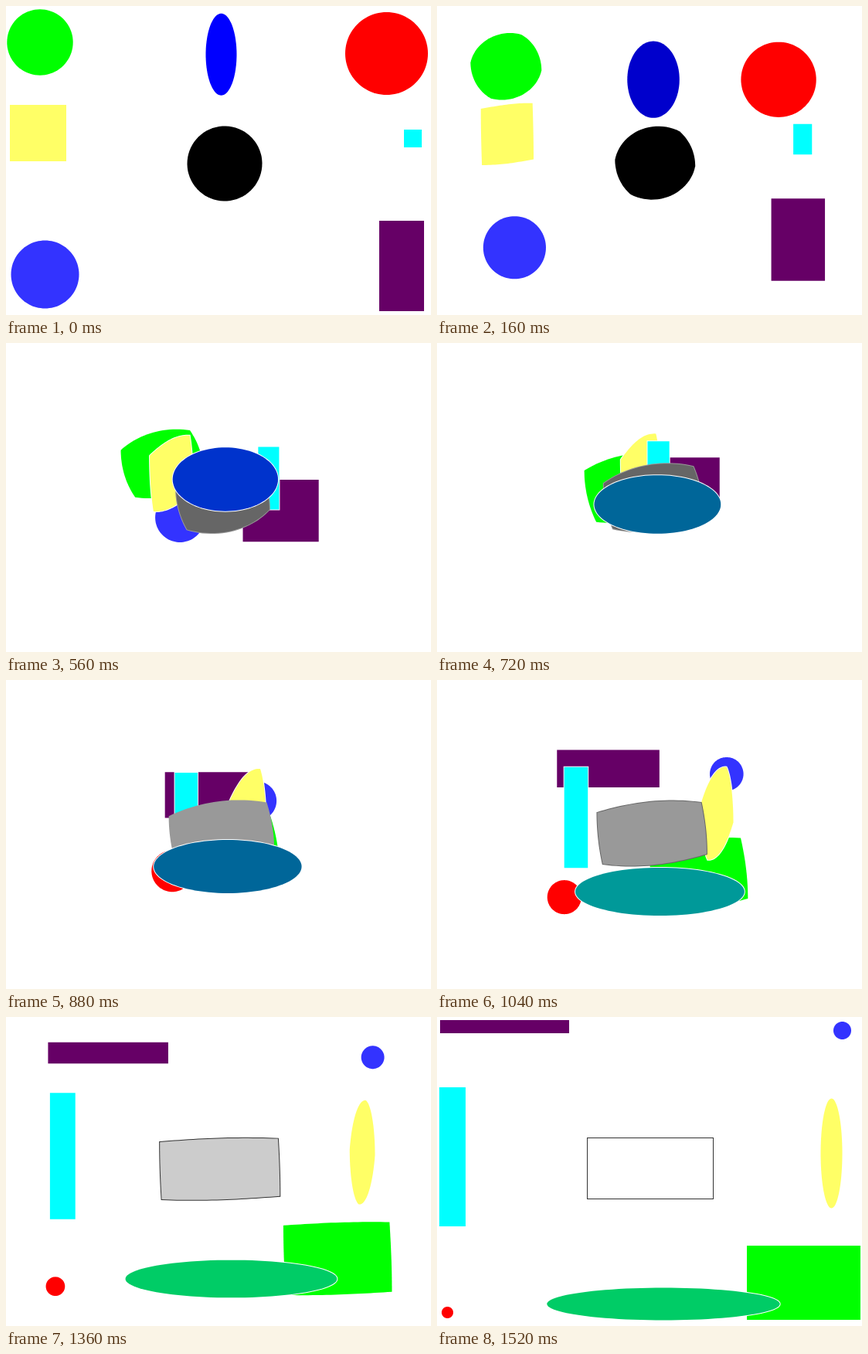
An HTML page with a canvas that plays this animation: 550 by 400 pixels, repeating every 1600 ms.

```html
<!DOCTYPE html>
<html lang="en">
<head>
<meta charset="utf-8">
<title>Shape tweens</title>
<style>
  html, body { margin: 0; width: 100%; height: 100%; overflow: hidden; background: #fff; }
  canvas { display: block; }
</style>
</head>
<body>
<canvas id="stage" width="550" height="400"></canvas>
<script>
const ctx = document.getElementById('stage').getContext('2d');
const STEPS = 20, STEP_MS = 80;
const SAMPLES = 24; // points per side of an outline

const lerp = (a, b, t) => a + (b - a) * t;

// An outline maps (side 0..3, position t 0..1) to a point, clockwise from the left.
// `corner` is the angle in degrees above the right-hand end where side 1 starts.
function ring(cx, cy, rx, ry = rx, corner = 90) {
  const knots = [180, 360 - corner, 360, 540 - corner, 540];
  return (side, t) => {
    const a = lerp(knots[side], knots[side + 1], t) * Math.PI / 180;
    return [cx + rx * Math.cos(a), cy + ry * Math.sin(a)];
  };
}

function box(x, y, w, h) {
  const corners = [[x, y], [x + w, y], [x + w, y + h], [x, y + h], [x, y]];
  return (side, t) => {
    const [p, q] = [corners[side], corners[side + 1]];
    return [lerp(p[0], q[0], t), lerp(p[1], q[1], t)];
  };
}

// Colours step through the six web-safe levels.
function webSafe(from, to, p) {
  const level = (c, i) => 51 * Math.round(lerp(c, to[i], p) / 51 - 0.05);
  return `rgb(${from.map(level)})`;
}

const solid = color => () => color;
const fade = (from, to) => p => webSafe(from, to, p);
const WHITE = [255, 255, 255];

// Back to front.
const shapes = [
  { from: ring(492.5, 61.5, 53.5), to: ring(13.5, 382.5, 7.5), fill: solid('#f00') },
  { from: ring(44, 47, 42.7, 42.7, 72), to: box(401, 296, 147, 96), fill: solid('#0f0') },
  { from: ring(50.5, 347.5, 44), to: ring(524.5, 17.5, 11.5), fill: solid('#33f') },
  { from: box(483, 278, 58, 117), to: box(4, 4, 167, 17), fill: solid('#606') },
  { from: box(5, 128, 73, 73), to: ring(510.5, 176.5, 14, 71, 86), fill: solid('#ff6') },
  { from: box(515, 160, 23, 23), to: box(3, 91, 34, 180), fill: solid('#0ff') },
  { from: ring(283, 204, 48.5, 48.5, 58), to: box(195, 157, 162, 78),
    fill: fade([0, 0, 0], WHITE), line: fade(WHITE, [51, 51, 51]) },
  { from: ring(278.5, 62.7, 20, 53), to: ring(293, 371.5, 150.7, 21),
    fill: p => p ? webSafe([0, 0, 240], [0, 204, 102], p) : '#00f' },
];

function drawShape({ from, to, fill, line = solid('#fff') }, p) {
  ctx.beginPath();
  for (let side = 0; side < 4; side++) {
    for (let i = 0; i < SAMPLES; i++) {
      const a = from(side, i / SAMPLES), b = to(side, i / SAMPLES);
      ctx.lineTo(lerp(a[0], b[0], p), lerp(a[1], b[1], p));
    }
  }
  ctx.closePath();
  // The fill covers the inner half, leaving a one-pixel outline.
  ctx.lineWidth = 2;
  ctx.strokeStyle = line(p);
  ctx.stroke();
  ctx.fillStyle = fill(p);
  ctx.fill();
}

const start = performance.now();

function render() {
  const elapsed = Math.max(0, performance.now() - start);
  const p = Math.floor(elapsed / STEP_MS) % STEPS / (STEPS - 1);
  ctx.fillStyle = '#fff';
  ctx.fillRect(0, 0, 550, 400);
  for (const shape of shapes) drawShape(shape, p);
  requestAnimationFrame(render);
}
render();
</script>
</body>
</html>
```
